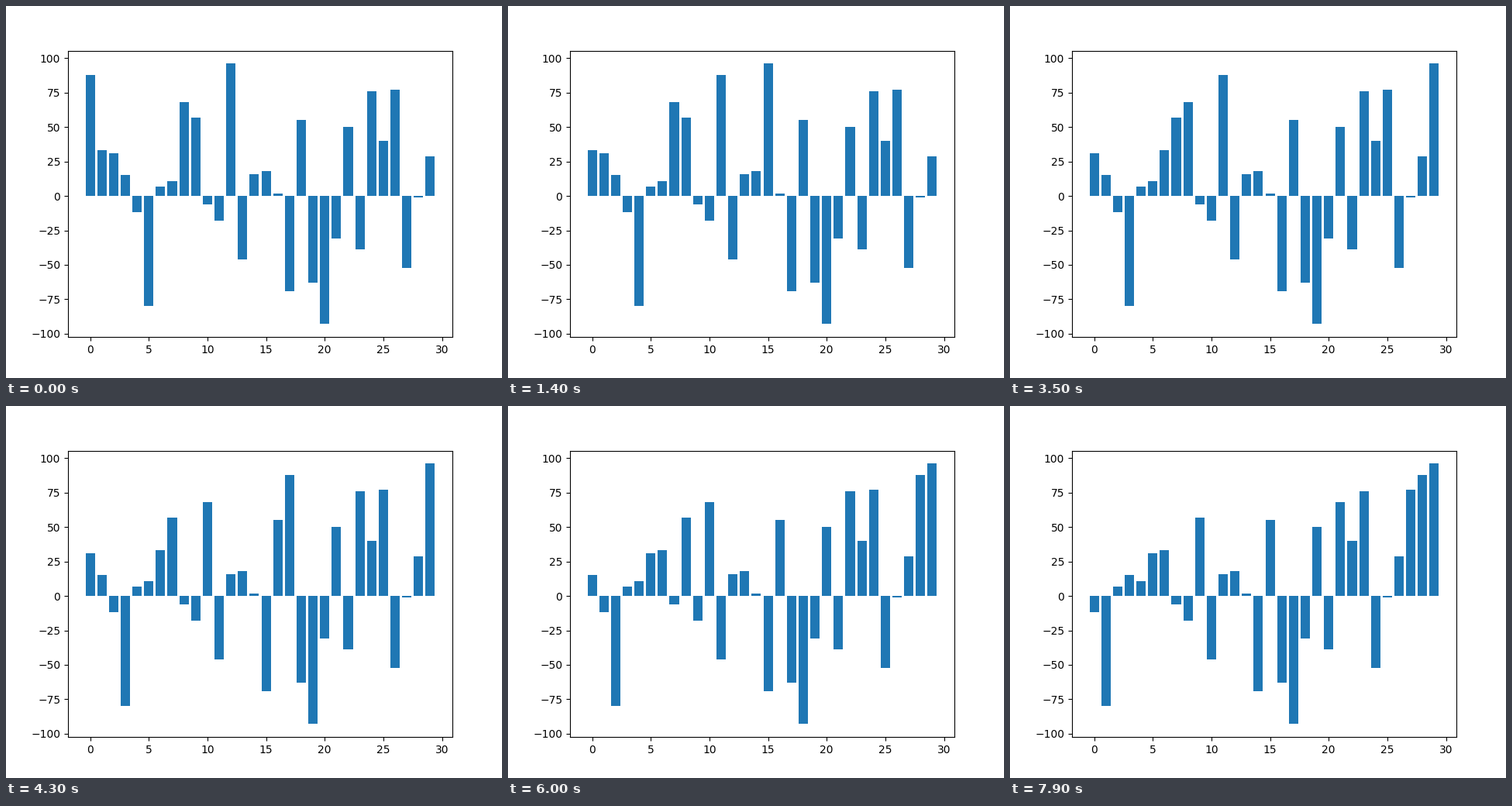
Recreate the animation shown at these times as a matplotlib script. Size 640x480 px, loop 8 s.

```python
from itertools import islice

import matplotlib.pyplot as plt
from matplotlib.animation import FuncAnimation

FRAMES = 80
INTERVAL = 100

# Unsorted bar heights; everything after the first picture follows from the sort.
START = [88, 33, 31, 15, -12, -80, 7, 11, 68, 57,
         -6, -18, 96, -46, 16, 18, 2, -69, 55, -63,
         -93, -31, 50, -39, 76, 40, 77, -52, -1, 29]


def bubble_sort(values):
    """Yield the list at the start and after every swap."""
    a = list(values)
    yield a[:]
    for end in range(len(a) - 1, 0, -1):
        for j in range(end):
            if a[j] > a[j + 1]:
                a[j], a[j + 1] = a[j + 1], a[j]
                yield a[:]


plt.rcParams["text.kerning_factor"] = 6  # classic glyph spacing

fig, ax = plt.subplots(figsize=(6.4, 4.8), dpi=100)
bars = ax.bar(range(len(START)), START)
states = list(islice(bubble_sort(START), FRAMES))


def update(i):
    for bar, height in zip(bars, states[i]):
        bar.set_height(height)
    return bars.patches


anim = FuncAnimation(fig, update, frames=FRAMES, interval=INTERVAL,
                     repeat=True, repeat_delay=0)

plt.show()
```
